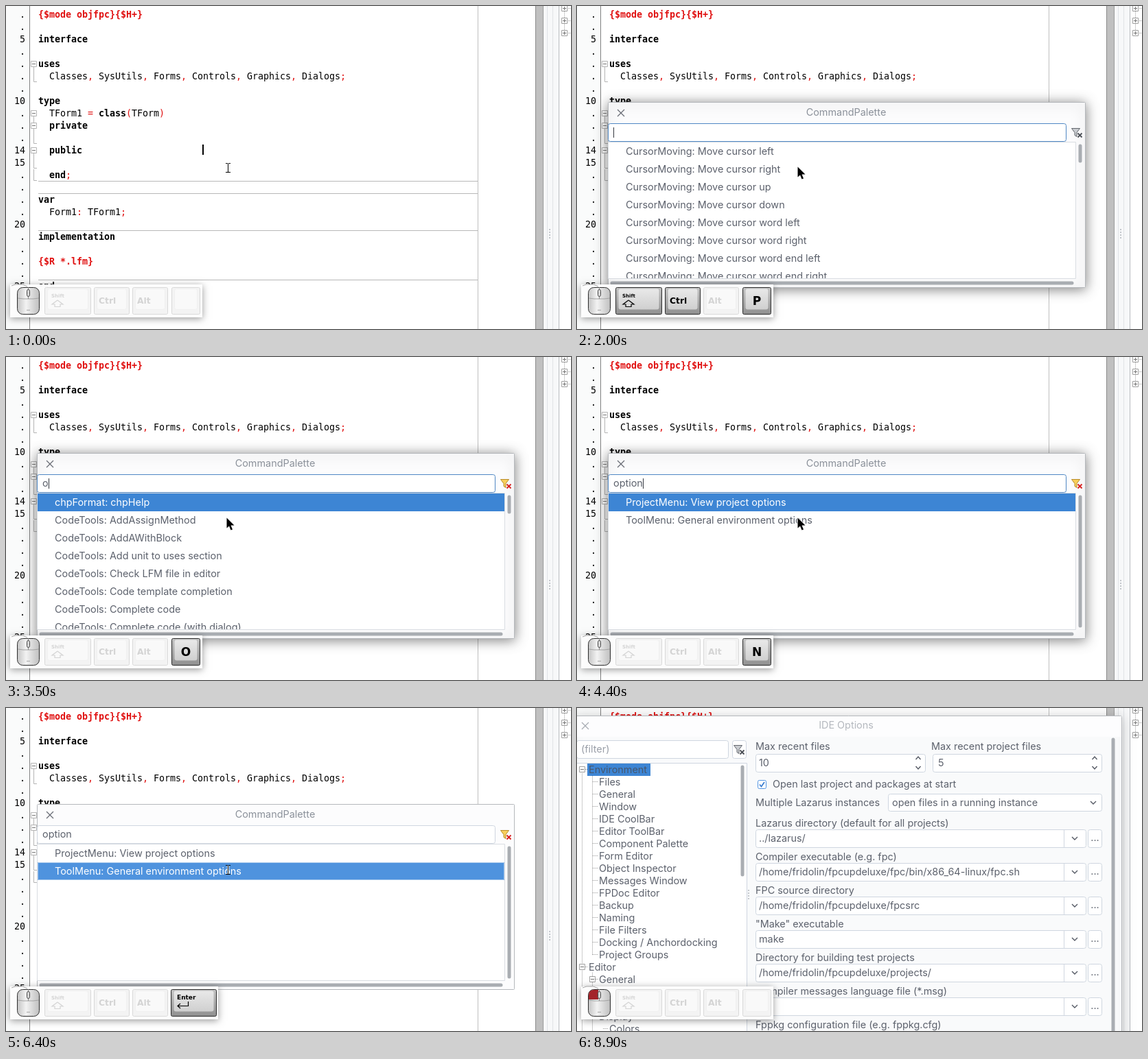
An HTML page with a canvas for the animation above (9 s loop, 823 px wide and 471 px high).

```html
<!DOCTYPE html>
<html lang="en">
<head>
<meta charset="utf-8">
<title>Command palette</title>
<style>
html, body { margin: 0; width: 100%; height: 100%; overflow: hidden; background: #fff; }
canvas { display: block; width: 823px; height: 471px; }
</style>
</head>
<body>
<canvas id="stage" width="823" height="471"></canvas>
<script>
const c = document.getElementById('stage').getContext('2d');
const LOOP = 9000;
const UI = '14.4px Inter, sans-serif';
const MONO = '13.333px "DejaVu Sans Mono", monospace';
const KEYFONT = '"DejaVu Sans", sans-serif';
const INK = '#5c616c', BLUE = '#3d85d4', LIGHT = '#4f93de', EDGE = '#cfd6e0';
const RED = '#e01010', FOLD = '#b4b4b4';

const within = (t, a, b) => t >= a && t < b;
const lerp = (a, b, k) => a + (b - a) * k;

function rect(x, y, w, h, fill) {
  c.fillStyle = fill;
  c.fillRect(x, y, w, h);
}

function box(x, y, w, h, r, fill, stroke) {
  c.beginPath();
  c.roundRect(x + .5, y + .5, w - 1, h - 1, r);
  if (fill) { c.fillStyle = fill; c.fill(); }
  if (stroke) { c.strokeStyle = stroke; c.lineWidth = 1; c.stroke(); }
}

function path(points, color, width = 1, dash = []) {
  c.beginPath();
  points.forEach(([x, y]) => c.lineTo(x, y));
  c.strokeStyle = color;
  c.lineWidth = width;
  c.setLineDash(dash);
  c.stroke();
  c.setLineDash([]);
}

function text(s, x, y, color = INK, font = UI, align = 'left') {
  c.font = font;
  c.fillStyle = color;
  c.textAlign = align;
  c.fillText(s, x, y);
}

function gradient(y, h, top, bottom) {
  const g = c.createLinearGradient(0, y, 0, y + h);
  g.addColorStop(0, top);
  g.addColorStop(1, bottom);
  return g;
}

function shadowed(alpha, blur, draw) {
  c.save();
  c.shadowColor = `rgba(0,0,0,${alpha})`;
  c.shadowBlur = blur;
  c.shadowOffsetY = 2;
  draw();
  c.restore();
}

function expander(cx, cy, sign, color = FOLD) {
  box(cx - 5, cy - 5, 9, 9, 0, '#fff', color);
  rect(cx - 3, cy - 1, 5, 1, '#777');
  if (sign === '+') rect(cx - 1, cy - 3, 1, 5, '#777');
}

// Code editor

const CODE = {
  3: '{$mode objfpc}{$H+}', 5: 'interface', 7: 'uses',
  8: '  Classes, SysUtils, Forms, Controls, Graphics, Dialogs;',
  10: 'type', 11: '  TForm1 = class(TForm)', 12: '  private', 14: '  public',
  16: '  end;', 18: 'var', 19: '  Form1: TForm1;', 21: 'implementation',
  23: '{$R *.lfm}', 25: 'end.'
};
const KEYWORD = /^(interface|uses|type|class|private|public|end|var|implementation)$/;

function codeLine(s, y) {
  let col = 0;
  for (const token of s.match(/\{.*?\}|\w+|\s+|./g)) {
    const directive = token[0] === '{';
    const bold = directive || KEYWORD.test(token);
    const color = directive || /^[,;:=().]$/.test(token) ? RED : '#000';
    text(token, 47 + col * 8, y, color, (bold ? 'bold ' : '') + MONO);
    col += token.length;
  }
}

function editor(caret) {
  rect(0, 0, 823, 471, '#fff');
  rect(0, 0, 34, 471, '#fafbfb');
  rect(34, 0, 1, 471, '#808080');
  rect(687, 0, 1, 471, '#c0c0c0');
  for (const y of [255, 273, 327, 399]) rect(47, y, 640, 1, '#b8b8b8');

  c.letterSpacing = '-0.027px';
  for (let n = 3; n <= 25; n++) {
    const y = 17 + (n - 3) * 18;
    text(n % 5 && n !== 14 ? '.' : n, 28, y, '#000', MONO, 'right');
    if (CODE[n]) codeLine(CODE[n], y);
  }
  c.letterSpacing = '0px';

  for (const [top, bottom] of [[89, 110], [179, 200], [215, 236], [238, 254]])
    path([[40.5, top], [40.5, bottom + .5], [45, bottom + .5]], FOLD);
  rect(40, 161, 1, 9, FOLD);
  for (const y of [85, 157, 175, 211]) expander(41, y, '-');
  if (caret) rect(286, 202, 2, 15, '#000');

  rect(771, 0, 12, 471, '#c0c0c0');
  rect(771, 0, 1, 471, '#8a8a8a');
  rect(782, 0, 1, 471, '#9c9c9c');
  rect(783, 0, 22, 471, '#f7f8f9');
  rect(788, 0, 1, 471, '#e0e3e6');
  rect(796, 0, 1, 471, '#e0e3e6');
  rect(805, 0, 1, 471, '#b9bcc0');
  for (let i = 0; i < 4; i++) rect(791, 325 + i * 4, 2, 2, '#c3c7cc');
  path([[813.5, 0], [813.5, 44]], '#a0a0a0', 1, [1, 1]);
  for (const y of [4, 22, 40]) {
    expander(814, y, '+', '#a0a0a0');
    path([[819, y - .5], [823, y - .5]], '#a0a0a0', 1, [1, 1]);
  }
}

// Shared dialog parts

function closeMark(x, y, color) {
  path([[x - 5, y - 5], [x + 5, y + 5]], color, 1.2);
  path([[x + 5, y - 5], [x - 5, y + 5]], color, 1.2);
}

function filterIcon(x, y, active) {
  c.beginPath();
  for (const [dx, dy] of [[0, 0], [12, 0], [7.5, 6], [7.5, 12], [4.5, 10], [4.5, 6]])
    c.lineTo(x + dx, y + dy);
  c.closePath();
  c.fillStyle = active ? '#f7cf5c' : '#c9ccd0';
  c.fill();
  c.strokeStyle = active ? '#b98b2a' : '#62666d';
  c.lineWidth = 1;
  c.stroke();
  const color = active ? '#d81e1e' : '#4b4f56';
  path([[x + 9, y + 7], [x + 15, y + 13]], color, 1.8);
  path([[x + 15, y + 7], [x + 9, y + 13]], color, 1.8);
}

function chevron(x, y, up = 1, w = 4) {
  path([[x - w, y - 2 * up], [x, y + 2 * up], [x + w, y - 2 * up]], '#555a64', 1.4);
}

// Command palette

const LISTS = {
  '': ['left', 'right', 'up', 'down', 'word left', 'word right', 'word end left', 'word end right']
    .map(s => 'CursorMoving: Move cursor ' + s),
  o: ['chpFormat: chpHelp', ...['AddAssignMethod', 'AddAWithBlock', 'Add unit to uses section',
    'Check LFM file in editor', 'Code template completion', 'Complete code',
    'Complete code (with dialog)'].map(s => 'CodeTools: ' + s)],
  op: ['Copy selection to clipboard', 'Open', 'Open at cursor', 'Open unit', 'Open project',
    'Open recent project', 'Open package', 'Open package file'].map(s => 'FileMenu: ' + s),
  opt: ['ProjectMenu: View project options', 'ToolMenu: General environment options']
};
const TYPING = [[3400, 'o'], [3600, 'op'], [3900, 'opt'], [4000, 'opti'], [4100, 'optio'], [4400, 'option']];

const typed = t => TYPING.reduce((s, [at, word]) => t >= at ? word : s, '');

function palette(t) {
  const word = typed(t);
  const shown = t < 3500 ? '' : word.slice(0, 3);
  const items = LISTS[shown];
  const focus = t < 5300;
  const selected = t < 3500 ? -1 : focus ? 0 : 1;

  shadowed(t < 6400 ? .5 : 0, 18, () => box(45, 140, 696, 271, 1, '#fcfcfd', '#b5b8bc'));
  closeMark(64, 156, '#6a6e76');
  text('CommandPalette', 392, 160, '#8b919a', UI, 'center');

  box(45, 171, 668, 27, 3, '#fff', focus ? '#4f87c4' : EDGE);
  text(word, 53, 189);
  if (within(t, 2000, 2500) || within(t, 2800, 5300)) {
    c.font = UI;
    rect(53 + Math.round(c.measureText(word).width), 177, 1, 15, '#33373f');
  }
  filterIcon(720.5, 178.5, word !== '');

  box(45, 198, 682, 200, 0, '#fff', '#d9dde2');
  c.save();
  c.beginPath();
  c.rect(46, 199, 680, 198);
  c.clip();
  items.forEach((s, i) => {
    const y = 199 + i * 26;
    if (i === selected) {
      rect(46, y, 680, 26, focus ? BLUE : LIGHT);
      if (t >= 6200) box(46, y, 680, 26, 0, null, '#a9c9ec');
    }
    text(s, 71, y + 18, i === selected ? '#fff' : INK);
  });
  c.restore();

  const short = items.length < 3;
  box(730, 201, 6, short ? 194 : 28, 3, '#a9adb2');
  box(48, 401, 676, 6, 3, '#a9adb2');
}

// Options dialog

const TREE = ['Environment', 'Files', 'General', 'Window', 'IDE CoolBar', 'Editor ToolBar',
  'Component Palette', 'Form Editor', 'Object Inspector', 'Messages Window', 'FPDoc Editor',
  'Backup', 'Naming', 'File Filters', 'Docking / Anchordocking', 'Project Groups', 'Editor',
  'General', 'Miscellaneous', 'Tab', 'Display', 'Colors'];
const DEPTH = { Environment: 0, Editor: 0, Miscellaneous: 2, Tab: 2, Colors: 2 };
const HOME = '/home/fridolin/fpcupdeluxe/';
const FIELDS = [
  ['Lazarus directory (default for all projects)', '../lazarus/'],
  ['Compiler executable (e.g. fpc)', HOME + 'fpc/bin/x86_64-linux/fpc.sh'],
  ['FPC source directory', HOME + 'fpcsrc'],
  ['"Make" executable', 'make'],
  ['Directory for building test projects', HOME + 'projects/'],
  ['Compiler messages language file (*.msg)', ''],
  ['Fppkg configuration file (e.g. fppkg.cfg)', '']
];

function tree() {
  box(-1, 80, 249, 400, 0, '#fff', EDGE);
  path([[7.5, 95], [7.5, 471]], '#9a9a9a', 1, [1, 1]);
  path([[22.5, 99], [22.5, 360]], '#9a9a9a', 1, [1, 1]);
  path([[22.5, 386], [22.5, 471]], '#9a9a9a', 1, [1, 1]);
  rect(15, 81, 92, 18, BLUE);
  TREE.forEach((name, i) => {
    const y = 90 + i * 18, depth = DEPTH[name] ?? 1;
    const x = 17 + depth * 15;
    path([[x - 9, y - .5], [x - 2, y - .5]], '#9a9a9a', 1, [1, 1]);
    if (depth === 0 || i === 17 || i === 20) expander(x - 9, y, '-', '#a0a0a0');
    text(name, x, y + 5, i ? INK : '#46566c');
  });
  box(238, 83, 6, 163, 3, '#a9adb2');
}

function spin(label, value, labelX, x, w, valueX) {
  text(label, labelX, 61);
  box(x, 67, w, 27, 3, '#fff', EDGE);
  text(value, valueX, 85);
  chevron(x + w - 11, 73, -1, 3.5);
  chevron(x + w - 11, 87, 1, 3.5);
}

function options(t) {
  const active = t < 8900;
  shadowed(active ? .5 : .2, 18, () => box(-4, 11, 798, 480, 2, '#f9fafb', '#b5b8bc'));
  rect(0, 12, 793, 30, '#fdfdfe');
  closeMark(12, 26, active ? '#6a6e76' : '#a9adb4');
  text('IDE Options', 392, 30, active ? '#8b919a' : '#b4b8be', UI, 'center');

  box(-1, 47, 222, 27, 3, '#fff', active ? '#4f97b4' : EDGE);
  if (!active) text('(filter)', 6, 65, '#9a9fa8');
  if (within(t, 7200, 7800) || within(t, 8200, 8900)) rect(7, 53, 1, 15, '#33373f');
  box(226, 47, 21, 27, 3, '#fff', EDGE);
  filterIcon(228.5, 54.5, false);
  tree();
  for (let i = 0; i < 4; i++) rect(249, 265 + i * 4, 2, 2, '#c3c7cc');

  spin('Max recent files', '10', 260, 260, 248, 265);
  spin('Max recent project files', '5', 516, 518, 247, 526);
  box(263, 105, 13, 13, 2, '#fff', '#5294e2');
  path([[266, 111.5], [268.5, 114.5], [273, 108]], '#3d7fd0', 1.8);
  text('Open last project and packages at start', 285, 116);
  text('Multiple Lazarus instances', 260, 143);
  box(453, 125, 312, 26, 3, '#fff', EDGE);
  text('open files in a running instance', 459, 143);
  chevron(752, 138);

  FIELDS.forEach(([label, value], i) => {
    const y = 168 + i * 49;
    text(label, 260, y + 5);
    box(260, y + 9, 482, 27, 3, '#fff', EDGE);
    rect(709, y + 10, 1, 25, EDGE);
    text(value, 265, y + 27);
    chevron(725, y + 22);
    box(744, y + 9, 21, 27, 3, '#fff', EDGE);
    text('...', 754.5, y + 26, INK, UI, 'center');
  });
  box(778, 43, 6, 440, 3, '#a9adb2');
}

// Keyboard and mouse overlay

function keycap(x, w, on) {
  if (on) {
    box(x, 410, w, 40, 2, gradient(410, 40, '#c4c4c4', '#8f8f8f'), '#2c2c2c');
    box(x + 4, 412, w - 8, 31, 3, gradient(412, 31, '#e9e9e9', '#cfcfcf'));
  } else {
    box(x, 410, w, 40, 2, '#f3f3f3', '#d9d9d9');
    box(x + 4, 412, w - 8, 31, 3, '#f9f9f9', '#f0f0f0');
  }
  return on ? '#000' : '#d4d4d4';
}

function mouse(pressed) {
  path([[8, 408], [14, 406], [24, 406], [31, 409]], '#a8a8a8', 1);
  const body = c.createLinearGradient(16, 0, 49, 0);
  body.addColorStop(0, '#c2c2c2');
  body.addColorStop(.4, '#f2f2f2');
  body.addColorStop(1, '#bdbdbd');
  box(16, 410, 33, 40, 8, body, '#2e2e2e');
  if (pressed) {
    c.beginPath();
    c.roundRect(17, 411, 14, 14, [7, 0, 0, 0]);
    c.fillStyle = '#a3242a';
    c.fill();
  }
  path([[17, 426], [25, 427], [32, 427], [40, 427], [48, 426]], '#a2a2a2');
  path([[32.5, 410], [32.5, 427]], '#888');
  box(30, 413, 5, 11, 2, '#d6d6d6', '#4c4c4c');
  rect(30, 443, 5, 1, '#aaa');
}

function activeKey(t) {
  if (within(t, 1400, 2100)) return 'P';
  if (within(t, 3400, 5000)) return typed(t).slice(-1).toUpperCase();
  return within(t, 6400, 7000) ? 'Enter' : '';
}

function overlay(t) {
  const key = activeKey(t), enter = key === 'Enter';
  shadowed(.4, 10, () => rect(6, 406, enter ? 303 : 280, 48, '#fcfcfc'));
  mouse(within(t, 5400, 5800) || t >= 8800);

  let ink = keycap(56, 68, within(t, 900, 2500));
  text('Shift', 66, 425, ink, 'bold 7px ' + KEYFONT);
  path([[75, 429], [83, 435], [79, 435], [79, 438.5], [71, 438.5], [71, 435], [67, 435], [75, 429]], ink, 1.2);
  ink = keycap(128, 52, within(t, 1000, 2300));
  text('Ctrl', 135, 434, ink, 'bold 12.3px ' + KEYFONT);
  ink = keycap(184, 52, false);
  text('Alt', 191, 434, ink, 'bold 12.3px ' + KEYFONT);

  ink = keycap(enter ? 240 : 241, enter ? 67 : 42, key !== '');
  if (enter) {
    text(key, 249, 425, ink, 'bold 9px ' + KEYFONT);
    path([[265.5, 428], [265.5, 434.5], [251, 434.5]], ink, 1.2);
    path([[254, 431], [250, 434.5], [254, 438]], ink, 1.2);
  } else if (key) {
    text(key, 262, 436, ink, 'bold 17px ' + KEYFONT, 'center');
  }
}

// Pointer

function arrow(x, y) {
  c.beginPath();
  for (const [dx, dy] of [[0, 0], [0, 15], [3.5, 12], [6, 18], [8.5, 17], [6, 11], [11, 11]])
    c.lineTo(x + dx, y + dy);
  c.closePath();
  c.lineJoin = 'round';
  c.strokeStyle = '#fff';
  c.lineWidth = 1.6;
  c.stroke();
  c.fillStyle = '#000';
  c.fill();
  c.lineJoin = 'miter';
}

function ibeam(x, y) {
  rect(x - 1, y - 6, 3, 13, 'rgba(255,255,255,.8)');
  rect(x, y - 6, 1, 13, '#000');
  for (const dy of [-7, 6]) {
    rect(x - 3, y + dy, 3, 1, '#000');
    rect(x + 1, y + dy, 3, 1, '#000');
  }
}

function pointer(t) {
  if (t >= 8900) return;
  if (within(t, 1600, 6400)) arrow(321.5, 234.5);
  else if (t < 8100) ibeam(323, 236);
  else if (t < 8400) arrow(330, 236);
  else if (t < 8800) {
    const k = Math.min(1, (Math.floor((t - 8400) / 100) + 1) / 3);
    arrow(lerp(330, 103, k), lerp(236, 7, k));
  } else arrow(11, 24);
}

function frame(now) {
  const t = Math.floor((now % LOOP) / 100) * 100;
  c.clearRect(0, 0, 823, 471);
  editor(t < 500 || within(t, 1000, 1600) || within(t, 6500, 6800));
  if (within(t, 2000, 6500)) palette(t);
  if (t >= 7200) options(t);
  pointer(t);
  overlay(t);
}

let start;
function tick(now) {
  start ??= now;
  frame(now - start);
  requestAnimationFrame(tick);
}
frame(0);
requestAnimationFrame(tick);
</script>
</body>
</html>
```
